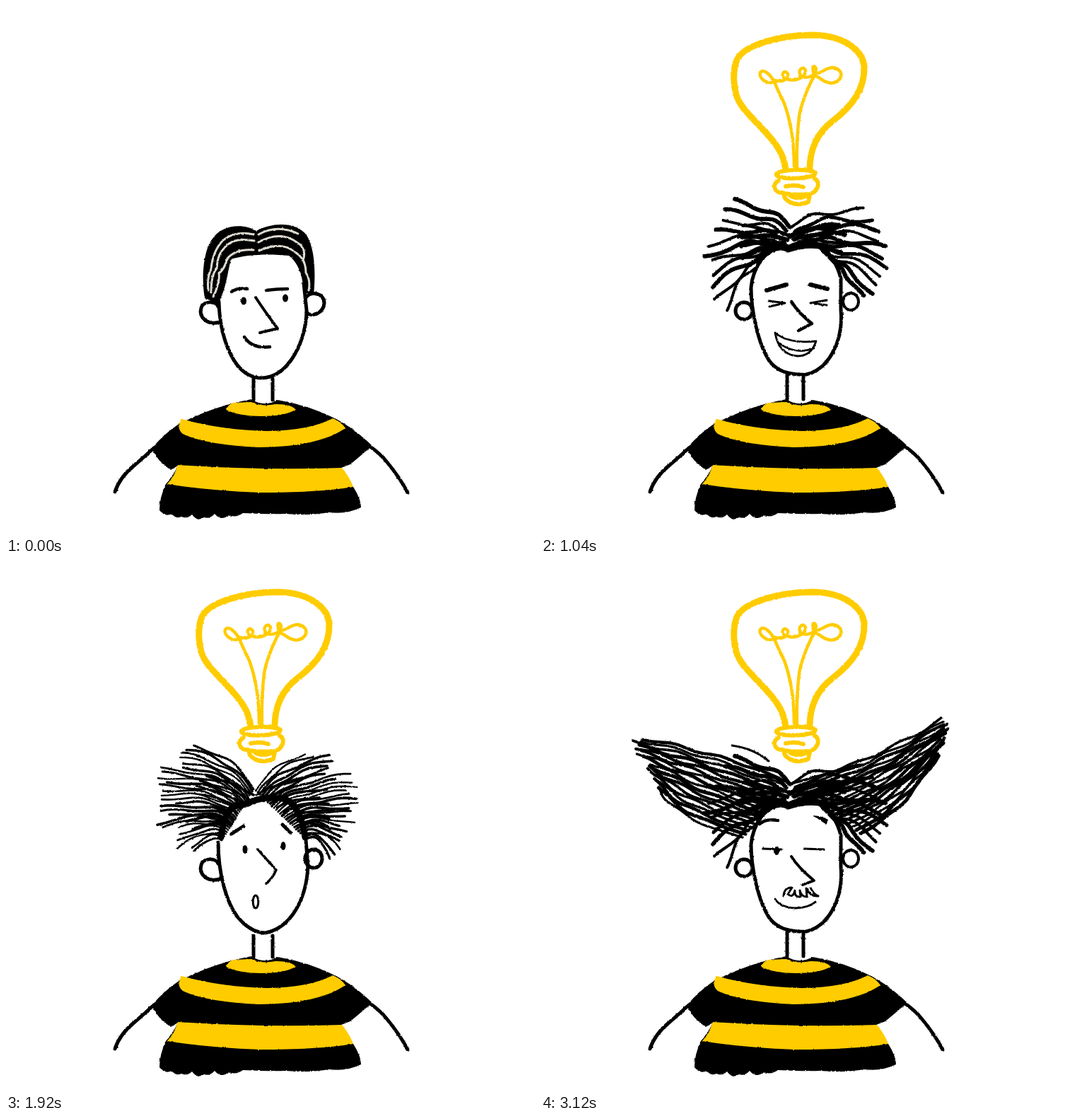
Write an HTML page that moves like this. It is 748 by 748 pixels and loops after 3440 ms.

```html
<!DOCTYPE html>
<html lang="en">
<head>
<meta charset="utf-8">
<title>Bright idea</title>
<style>
html, body { margin: 0; width: 100%; height: 100%; overflow: hidden; background: #fff; }
svg { display: block; width: 100vw; height: 100vh; }
</style>
</head>
<body>
<svg viewBox="0 0 748 748">
  <filter id="rough" filterUnits="userSpaceOnUse" x="0" y="0" width="748" height="748" color-interpolation-filters="sRGB">
    <feTurbulence type="fractalNoise" baseFrequency=".3" numOctaves="2" seed="4"/>
    <feDisplacementMap in="SourceGraphic" scale="2.4" xChannelSelector="R" yChannelSelector="G"/>
  </filter>
  <g id="scene" filter="url(#rough)" stroke-linecap="round" stroke-linejoin="round"></g>
</svg>
<script>
const INK = '#000', GOLD = '#ffcc00';
const line = (d, w = 4.5, color = INK, fill = 'none') =>
  `<path d="${d}" fill="${fill}" stroke="${color}" stroke-width="${w}"/>`;
const area = (d, color = INK) => `<path d="${d}" fill="${color}"/>`;
const dot = (x, y, rx, ry) => `<ellipse cx="${x}" cy="${y}" rx="${rx}" ry="${ry}" fill="${INK}"/>`;
const ring = (x, y, rx, ry, w = 5) =>
  `<ellipse cx="${x}" cy="${y}" rx="${rx}" ry="${ry}" fill="none" stroke="${INK}" stroke-width="${w}"/>`;

const mix = (a, b, t) => a.map((v, i) => v + (b[i] - v) * t);
const quad = (a, b, c, t) => mix(mix(a, b, t), mix(b, c, t), t);

function random(seed) {
  return () => {
    seed = (seed * 16807) % 2147483647;
    return seed / 2147483647;
  };
}

// Strands spread between two root points, bend between two control points, end along a curve of tips.
function fan({ n, w, wave, jitter, roots, bends, tips, seed }, shift) {
  const rnd = random(seed * 7919);
  let out = '';
  for (let i = 0; i < n; i++) {
    const t = i / (n - 1), reach = 1 - jitter * rnd(), phase = rnd() * 6.3 + shift;
    const root = mix(...roots, t), bend = mix(...bends, t), tip = quad(...tips, t);
    const dx = tip[0] - root[0], dy = tip[1] - root[1], len = Math.hypot(dx, dy);
    const points = [];
    for (let k = 0; k <= 18; k++) {
      const s = k / 18 * reach, p = quad(root, bend, tip, s);
      const off = wave * Math.min(1, s * 2) * Math.sin(s * len / 11 + phase);
      points.push((p[0] - dy / len * off).toFixed(1) + ' ' + (p[1] + dx / len * off).toFixed(1));
    }
    out += line('M' + points.join('L'), (w * (.75 + rnd() * .5)).toFixed(1));
  }
  return out;
}

const shirt =
  line('M209 625Q195 638 182 649Q161 666 154 687', 5) +
  line('M515 623Q529 633 538 644Q557 667 568 688', 5) +
  area('M347 556C302 564 268 579 243 592Q222 606 206 626Q215 645 233 656L243 650Q235 667 226 676' +
       'Q217 695 217 713q8 10 17 5q7 8 14 4q8 4 15-3q8 11 17 4q8 3 15-5q9 11 20 2q10 4 20-3' +
       'q40 2 60 1q35 3 62-2q25 3 45-7Q502 697 491 680L474 653L487 648L518 622Q492 597 467 584' +
       'Q430 565 384 557Q365 568 347 556Z') +
  area('M322 561L347 560Q360 567 382 563Q405 563 409 571Q394 580 361 580Q330 580 311 571Q313 564 322 561Z', GOLD) +
  area('M248 584Q305 600 370 601Q430 600 462 583Q474 588 480 597Q440 624 357 624Q280 620 250 605Q240 597 248 584Z', GOLD) +
  area('M243 649Q360 657 475 653Q487 668 491 680Q440 688 360 688Q285 685 228 676Q238 665 243 649Z', GOLD);

const bulb =
  line('M346 231C342 188 294 164 278 131C271 112 271 88 278 74C292 52 345 41 385 41' +
       'C430 42 455 63 457 86C458 116 442 140 412 163C390 180 380 202 380 231', 9, GOLD) +
  line('M333 239C330 230 388 230 388 236C389 245 335 246 333 239Z' +
       'M336 247C324 254 332 265 342 264Q352 268 380 266C393 262 395 248 387 244' +
       'M346 255Q360 252 371 256M344 266Q343 272 350 276Q362 284 378 277L380 267M352 268Q362 274 374 269', 6, GOLD) +
  line('M358 228Q358 176 344 138Q334 118 330 107C320 112 307 102 310 94C316 87 325 100 329 105' +
       'C342 108 351 104 349 96C345 89 338 96 344 102C355 108 375 103 374 91C371 83 362 91 367 98' +
       'C373 104 389 100 389 89C386 80 381 90 387 95C396 97 400 88 412 87C429 89 428 106 412 109' +
       'C399 110 393 98 386 99Q369 132 365 156Q361 190 362 228', 4.5, GOLD);

const neck = { wide: line('M350 527V557M377 527V557', 5), thin: line('M348 522V556M371 525V556', 5) };

const leftEar = 'M302 447C285 452 272 440 276 427C279 416 297 417 300 425';
const rightEar = 'M425 411C432 403 450 406 450 420C449 435 432 440 425 434';
const plainHead =
  line('M301 418C302 460 318 526 362 526C402 524 425 470 425 430L421 392', 5, INK, '#fff') +
  line(leftEar + rightEar, 5) + neck.wide;
const tallHead =
  line('M297 398C297 430 307 478 323 502C335 518 355 522 375 521C406 514 428 475 424 430' +
       'L424 385Q416 354 394 341Q372 338 350 346Q332 336 312 358Q299 376 297 398Z', 5, INK, '#fff') +
  ring(287, 431, 12, 12) + ring(438, 418, 11, 12, 4) + neck.thin;
const startledHead =
  line('M300 395C300 440 312 480 327 500C341 517 354 523 367 523C403 516 425 475 427 428L424 392', 5, INK, '#fff') +
  line(leftEar, 5) + ring(435, 418, 12, 13) + neck.wide;

const wildHair = [
  { n: 11, w: 5, wave: 4, jitter: .12, seed: 3,
    roots: [[351, 312], [308, 368]], bends: [[330, 284], [292, 368]], tips: [[270, 276], [196, 350], [256, 436]] },
  { n: 11, w: 5, wave: 4, jitter: .12, seed: 8,
    roots: [[352, 314], [418, 368]], bends: [[385, 285], [432, 370]], tips: [[466, 290], [526, 362], [458, 418]] },
  { n: 4, w: 6, wave: 2, jitter: .1, seed: 5,
    roots: [[352, 326], [340, 340]], bends: [[325, 312], [315, 345]], tips: [[282, 312], [270, 330], [284, 356]] },
  { n: 4, w: 6, wave: 2, jitter: .1, seed: 6,
    roots: [[352, 326], [370, 338]], bends: [[385, 308], [400, 335]], tips: [[425, 312], [440, 330], [430, 352]] }
];
const wildLine = line('M308 358Q328 330 350 342Q378 328 396 341L416 362', 8);

const poses = {
  calm: {
    hair: [],
    head: plainHead,
    top: area('M300 421L281 413C276 385 279 345 292 329C304 310 335 306 354 318C375 306 410 304 425 324' +
              'C437 343 438 378 435 409L421 405C420 380 412 362 400 353C372 350 340 351 318 358C312 384 311 400 300 421Z') +
         line('M350 323Q325 317 307 331Q292 347 290 372Q284 384 286 402M351 332Q320 326 308 343Q299 351 298 371' +
              'Q290 380 290 405M350 345Q325 343 313 357Q309 372 301 378Q303 390 293 411' +
              'M357 323Q384 308 413 322M357 334Q388 317 411 334Q426 342 420 360M358 346Q390 331 410 349Q424 358 424 377Q431 388 428 402',
              3, '#dedbd2'),
    face: line('M319 404Q328 398 341 400M368 402Q383 400 398 400') + dot(336, 417, 4, 5.5) + dot(395, 413, 4, 5.5) +
          line('M353 412Q366 432 384 456L359 462', 4) + line('M337 468Q348 485 373 482')
  },
  pleased: {
    hair: [
      { n: 23, w: 3, wave: 1.2, jitter: .25, seed: 2,
        roots: [[354, 321], [319, 352]], bends: [[332, 299], [309, 382]], tips: [[304, 310], [243, 360], [298, 421]] },
      { n: 23, w: 3, wave: 1.2, jitter: .25, seed: 9,
        roots: [[354, 321], [403, 352]], bends: [[378, 300], [417, 382]], tips: [[414, 306], [482, 358], [438, 412]] }
    ],
    head: plainHead,
    top: line('M317 352Q335 343 352 347Q378 342 402 351', 6),
    face: line('M321 403Q330 400 342 401M370 397Q385 396 397 402') +
          line('M333 415Q340 418 335 423M396 411Q387 413 392 419', 2.8) +
          line('M354 413Q368 433 384 456L361 460', 3.5) +
          area('M334 466Q352 481 379 479Q368 490 352 487Q340 482 334 466Z')
  },
  laughing: {
    hair: wildHair,
    head: tallHead,
    top: wildLine,
    face: line('M319 402L347 394M381 394L405 400', 6) +
          line('M322 417L345 420L323 425M404 416L381 420L404 423', 3) +
          line('M354 418Q365 435 383 449L364 459') +
          line('M331 462Q350 478 389 474Q382 495 363 495Q336 493 331 462ZM336 476Q358 494 386 484', 2.8)
  },
  startled: {
    hair: [
      { n: 26, w: 3, wave: 2.2, jitter: .22, seed: 4,
        roots: [[350, 320], [305, 392]], bends: [[322, 268], [285, 378]], tips: [[258, 258], [142, 322], [258, 422]] },
      { n: 26, w: 3, wave: 2.2, jitter: .22, seed: 11,
        roots: [[353, 322], [425, 390]], bends: [[378, 280], [450, 378]], tips: [[440, 264], [562, 318], [460, 426]] },
      { n: 8, w: 3.5, wave: 1.5, jitter: .2, seed: 12,
        roots: [[350, 328], [308, 372]], bends: [[318, 310], [292, 360]], tips: [[270, 295], [240, 325], [255, 380]] },
      { n: 8, w: 3.5, wave: 1.5, jitter: .2, seed: 13,
        roots: [[354, 328], [422, 370]], bends: [[380, 312], [436, 360]], tips: [[440, 300], [475, 330], [460, 378]] }
    ],
    head: startledHead,
    top: line('M304 388Q309 350 325 342Q340 343 350 336Q385 326 402 338Q419 355 423 388', 9),
    face: line('M319 383L336 372M391 370L402 381', 5) + dot(338, 405, 3.5, 6) + dot(392, 400, 3.5, 6) +
          line('M356 405L382 434Q377 446 368 453', 3.5) + ring(353, 479, 3.8, 9, 3)
  },
  suave: {
    hair: [
      ...wildHair,
      { n: 17, w: 4.2, wave: 2, jitter: .1, seed: 15,
        roots: [[350, 310], [285, 388]], bends: [[250, 266], [176, 358]], tips: [[120, 244], [140, 275], [166, 312]] },
      { n: 17, w: 4.2, wave: 2, jitter: .07, seed: 16,
        roots: [[353, 312], [452, 382]], bends: [[470, 284], [515, 352]], tips: [[582, 211], [574, 248], [564, 266]] }
    ],
    head: tallHead,
    top: wildLine + line('M270 258Q300 262 322 280', 3),
    face: line('M309 369Q318 361 335 364') + area('M383 357Q397 357 406 363L403 370Q395 363 383 357Z') +
          line('M314 404L340 405', 3) + dot(333, 407, 4, 6) +
          line('M354 415Q364 431 386 449L370 455', 4) +
          line('M343 471Q344 458 355 459L349 468Q356 475 359 463Q358 473 367 472L366 463Q368 472 376 472L375 460Q381 472 392 471Q385 468 381 459', 3) +
          line('M331 475Q338 487 360 488Q380 487 388 479', 2.8)
  }
};
const wink = line('M372 404L400 405', 3), openEye = wink + dot(391, 407, 4, 6);

function draw(name, alt, closed) {
  const p = poses[name];
  const eye = name === 'suave' ? (closed ? wink : openEye) : '';
  return shirt + (name === 'calm' ? '' : bulb) + p.hair.map(h => fan(h, alt)).join('') + p.head + p.top +
    `<g transform="translate(0 ${alt})">${p.face}${eye}</g>`;
}

// Each pose trembles between two drawings.
function state(t) {
  const flip = (start, step) => Math.floor((t - start) / step) % 2;
  if (t < 560) return ['calm', 0, false];
  if (t < 1040) return ['pleased', flip(560, 80), false];
  if (t < 1760) return ['laughing', t < 1200 ? 0 : 1 - flip(1200, 80), false];
  if (t < 2320) return ['startled', flip(1760, 80), false];
  return ['suave', t < 2760 ? flip(2280, 120) : 0, t >= 3120 || (t >= 2880 && t < 3000)];
}

const scene = document.getElementById('scene'), start = performance.now();
let shown = '';
function tick() {
  const now = state((performance.now() - start) % 3440), key = now.join();
  if (key !== shown) {
    scene.innerHTML = draw(...now);
    shown = key;
  }
  requestAnimationFrame(tick);
}
tick();
</script>
</body>
</html>
```
